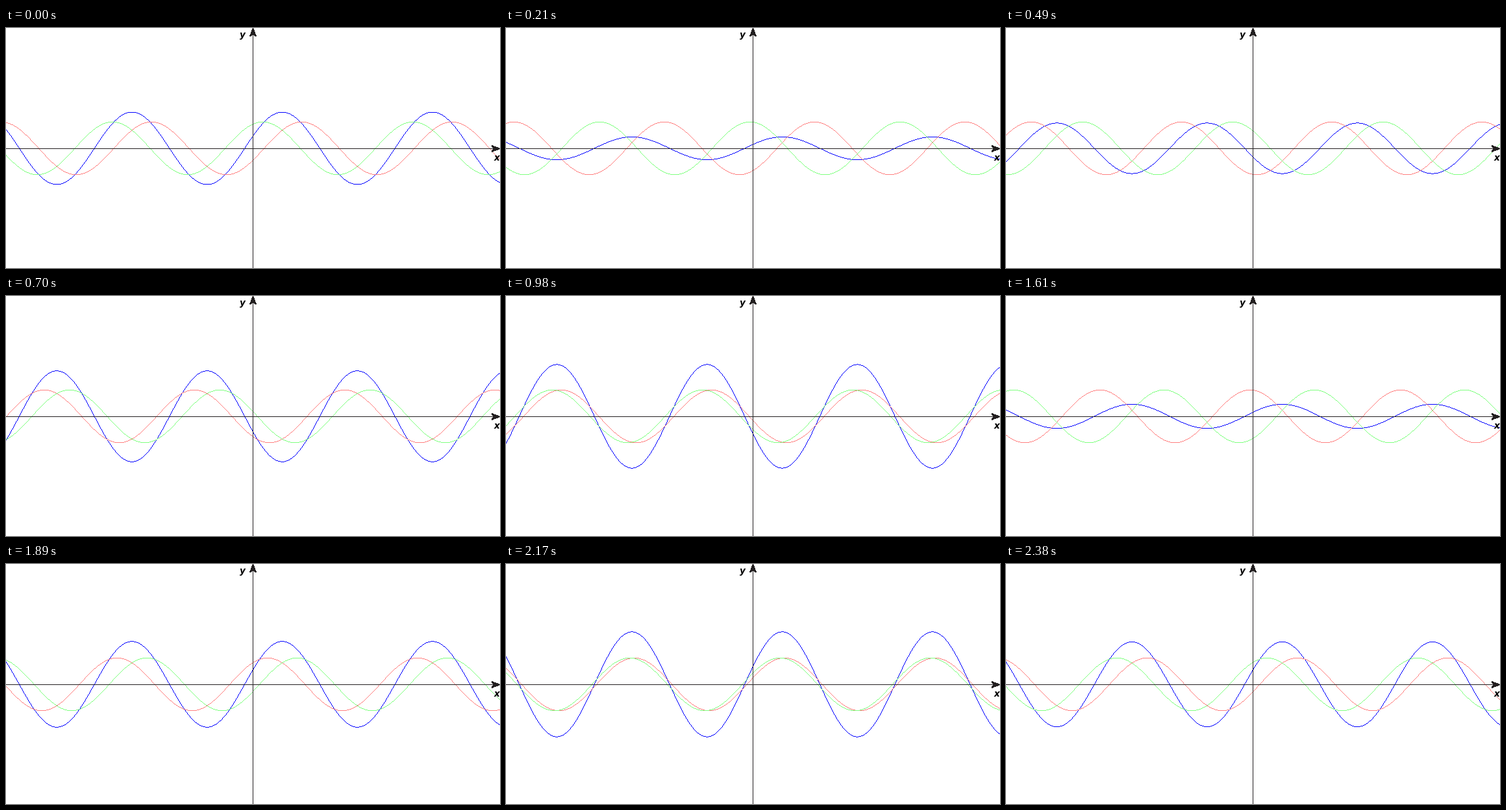
A matplotlib script that plays this animation: 761 by 371 pixels, repeating every 2450 ms.

```python
import numpy as np
import matplotlib.pyplot as plt
from matplotlib.animation import FuncAnimation
from matplotlib.patches import Polygon

W, H, DPI = 761, 371, 64
FRAMES, INTERVAL = 35, 70

AXIS_COL, AXIS_ROW = 380, 186
WAVELENGTH = 231.5
CREST = 425.55       # antinode of the standing wave
START = 30.0         # offset of the travelling crests at time zero
AMP = 40.75

BLUE, RED, GREEN = (0, 0, 255), (255, 128, 128), (128, 255, 128)
INK = (35, 31, 32)

rows = np.arange(H)[:, None]
cols = np.arange(W)


def wave(x, shift):
    return AMP * np.cos(2 * np.pi * (x - CREST - shift) / WAVELENGTH)


def plot_curve(img, func, color):
    """Draw y = func(x) as a crisp line one pixel wide."""
    left, mid, right = (AXIS_ROW - func(cols + d) for d in (0, 0.5, 1))
    steep = np.abs(right - left) > 1
    low = np.where(steep, np.round(np.minimum(left, right)), np.floor(mid))
    high = np.where(steep, np.round(np.maximum(left, right)), low + 1)
    img[(rows >= low) & (rows < high)] = color


def render(frame):
    shift = START + WAVELENGTH * frame / FRAMES
    img = np.full((H, W, 3), 255, np.uint8)
    plot_curve(img, lambda x: wave(x, shift) + wave(x, -shift), BLUE)
    plot_curve(img, lambda x: wave(x, shift), RED)
    plot_curve(img, lambda x: wave(x, -shift), GREEN)
    img[AXIS_ROW, :] = INK
    img[:, AXIS_COL] = INK
    return img


fig = plt.figure(figsize=(W / DPI, H / DPI), dpi=DPI, facecolor="white")
ax = fig.add_axes([0, 0, 1, 1])
ax.axis("off")
picture = ax.imshow(render(0), extent=(0, W, H, 0), interpolation="nearest",
                    aspect="auto")
ax.set_xlim(0, W)
ax.set_ylim(H, 0)

# Barbed arrowheads at the ends of the axes
cx, cy = AXIS_COL + 0.5, AXIS_ROW + 0.5
up = [(cx, 0), (cx + 5, 13), (cx, 9.8), (cx - 5, 13)]
right = [(W, cy), (W - 13, cy + 5), (W - 9.8, cy), (W - 13, cy - 5)]
for head in (up, right):
    ax.add_patch(Polygon(head, facecolor=[c / 255 for c in INK],
                         edgecolor="none", antialiased=False))

for x, y, label in ((364.8, 15, "y"), (755.7, 205, "x")):
    ax.text(x, y, label, family="DejaVu Sans", style="oblique", weight="bold",
            size=13.6 * 72 / DPI, ha="center", va="baseline", color="black")


def update(frame):
    picture.set_data(render(frame))
    return [picture]


anim = FuncAnimation(fig, update, frames=FRAMES, interval=INTERVAL,
                     repeat=True, repeat_delay=0, blit=False)
plt.show()
```
